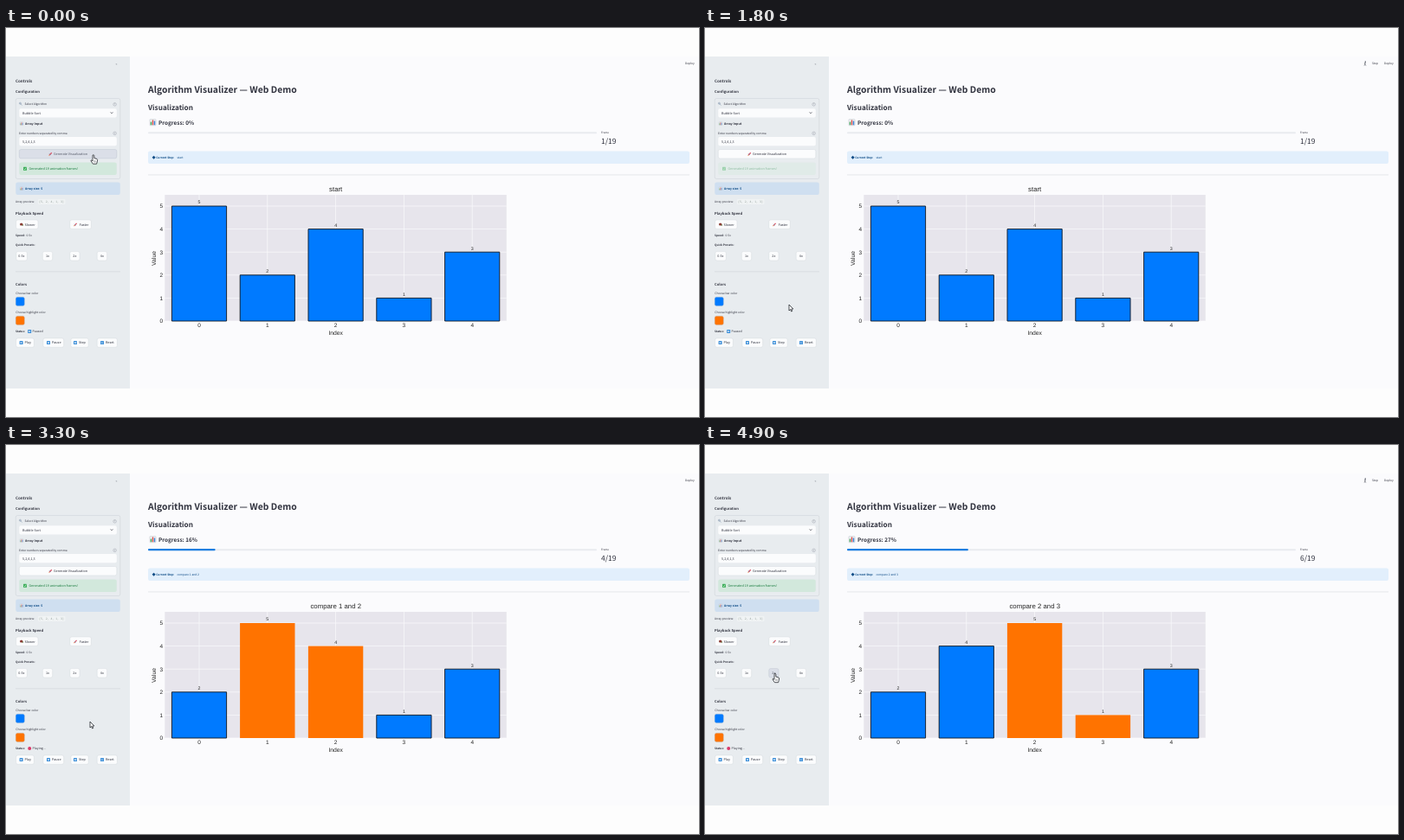
These frames come from a looping animation (800x450 px, 5000 ms). An HTML page with a canvas:

```html
<!DOCTYPE html>
<html lang="en">
<head>
<meta charset="utf-8">
<title>Algorithm Visualizer</title>
<style>
html, body { margin: 0; width: 100%; height: 100%; overflow: hidden; background: #fdfdfd; }
canvas { display: block; }
</style>
</head>
<body>
<canvas id="stage" width="800" height="450"></canvas>
<script>
const c = document.getElementById('stage').getContext('2d');
const UI = '"Noto Sans CJK JP", "Noto Sans CJK SC", "Noto Sans CJK", "Open Sans", sans-serif';
const PLOT = '"Liberation Sans", Arial, sans-serif';
const MONO = '"Noto Sans Mono", "DejaVu Sans Mono", monospace';
const INK = '#31333f', BLUE = '#007aff', ORANGE = '#ff7300', LINK = '#0b4a85';
const LOOP = 5000, TICK = 100;
const ZOOM = 0.2634;            // page zoom: CSS px to stage px
const LATIN = 1 / 1.117;        // size correction for the UI face

// Bubble sort states and the times at which they appear
const times = [0, 1900, 2500, 3200, 3800, 4400];
const percents = [0, 5, 11, 16, 22, 27];
const steps = [{ label: 'start', arr: [5, 2, 4, 1, 3], hot: [] }];
for (let i = 0, arr = steps[0].arr; i < 3; i++) {
  steps.push({ label: `compare ${i} and ${i + 1}`, arr, hot: [i, i + 1] });
  arr = arr.slice();
  [arr[i], arr[i + 1]] = [arr[i + 1], arr[i]];
  steps.push({ label: `swapped ${i} & ${i + 1}`, arr, hot: [i, i + 1] });
}

function type(s, x, y, size, font, color, align = 'left') {
  c.save();
  c.translate(x, y);
  c.scale(0.1, 0.1);
  c.font = font.replace('$', size * 10 + 'px');
  c.textAlign = align;
  c.fillStyle = color;
  c.fillText(s, 0, 0);
  c.restore();
}

// UI text, y is the middle of the capitals
function text(s, x, y, px = 14, bold = false, color = INK) {
  const size = px * ZOOM, fit = bold && px < 40 ? 0.97 : 1;
  type(s, x, y + size * 0.32, size * LATIN * fit, `${bold ? 700 : 400} $ ${UI}`, color);
}
const plotText = (s, x, y, size, color = '#262626', align = 'center') =>
  type(s, x, y + size * 0.36, size, `400 $ ${PLOT}`, color, align);

function box(x, y, x2, y2, fill, stroke, r = 2) {
  c.beginPath();
  c.roundRect(x, y, x2 - x, y2 - y, r);
  if (fill) { c.fillStyle = fill; c.fill(); }
  if (stroke) { c.strokeStyle = stroke; c.lineWidth = 0.4; c.stroke(); }
}
function rect(x, y, w, h, fill) { c.fillStyle = fill; c.fillRect(x, y, w, h); }
function dot(x, y, r, fill) { c.beginPath(); c.arc(x, y, r, 0, 7); c.fillStyle = fill; c.fill(); }
function line(color, width, ...p) {
  c.beginPath();
  for (let i = 0; i < p.length; i += 2) c.lineTo(p[i], p[i + 1]);
  c.strokeStyle = color;
  c.lineWidth = width;
  c.stroke();
}
function shape(points, x, y, fill) {
  c.beginPath();
  for (let i = 0; i < points.length; i += 2) c.lineTo(x + points[i], y + points[i + 1]);
  c.closePath();
  c.fillStyle = fill;
  c.fill();
}

// Small pictograms centred on x, y
function chart(x, y, s) {
  box(x - s / 2, y - s / 2, x + s / 2, y + s / 2, '#eef1f4', '#b4bcc6', s * 0.1);
  [['#43a85c', 0.5], ['#e2504a', 0.8], ['#3f83d8', 0.65]].forEach(([col, h], i) =>
    rect(x + s * (i * 0.28 - 0.38), y + s * (0.42 - h), s * 0.2, s * h, col));
}
function rocket(x, y) {
  line('#d8586a', 1.3, x - 1.4, y + 1.4, x + 1.3, y - 1.3);
  line('#7f93ad', 0.8, x - 1.4, y - 0.2, x + 0.2, y + 1.4);
  dot(x - 1.6, y + 1.6, 0.5, '#f08a3c');
}
function turtle(x, y) {
  box(x - 1.7, y - 1.5, x + 1.5, y + 1.4, '#8a3b33', null, 1);
  dot(x + 1.6, y + 0.8, 0.7, '#5b7a3c');
}
function key(kind, x, y) {
  box(x - 2, y - 2, x + 2, y + 2, '#3b8ed8', null, 0.6);
  if (kind === 'pause') {
    rect(x - 0.9, y - 1, 0.6, 2, '#fff');
    rect(x + 0.3, y - 1, 0.6, 2, '#fff');
  } else if (kind === 'reset') {
    c.beginPath(); c.arc(x, y, 0.9, 0.4, 5.4);
    c.strokeStyle = '#fff'; c.lineWidth = 0.5; c.stroke();
  } else {
    shape([-0.8, -1.1, 1, 0, -0.8, 1.1], x, y, '#fff');
    if (kind === 'step') rect(x + 0.8, y - 1, 0.4, 2, '#fff');
  }
}
function help(x, y) {
  c.beginPath(); c.arc(x, y, 1.8, 0, 7);
  c.strokeStyle = '#8a8f9a'; c.lineWidth = 0.4; c.stroke();
  type('?', x, y + 1, 2.6, `400 $ ${UI}`, '#70757f', 'center');
}
function button(x, x2, y, label, tx, hover, icon) {
  box(x, y, x2, y + 10.4, hover ? '#dbdfe8' : '#fbfcfd', hover ? '#b9bfcc' : '#d0d4da');
  if (icon) icon();
  text(label, tx, y + 5.2, 16, false, hover ? '#555a68' : INK);
}

function sidebar(playing, hover, stale) {
  rect(0, 33, 143, 384, '#e8ecef');
  text('«', 126.5, 41, 18, false, '#7d828c');
  text('Controls', 11, 61, 20, true);
  text('Configuration', 11, 73.6, 18, true);
  box(11.3, 81.5, 131.8, 174.5, null, '#c3c8cf');

  line('#8296ad', 0.6, 16.2, 87, 18.6, 89.4);
  c.beginPath(); c.arc(16.4, 87.2, 1, 0, 7); c.stroke();
  text('Select Algorithm', 21.5, 88.2);
  help(125.6, 88.3);
  box(15.3, 93.3, 127.8, 103.5, '#fbfcfd');
  text('Bubble Sort', 19, 98.3, 16);
  line(INK, 0.7, 120.7, 97.4, 122, 98.8, 123.3, 97.4);
  chart(18, 110.6, 3.6);
  text('Array Input', 22, 110.6, 16, true);
  text('Enter numbers separated by comma', 15, 121.6);
  help(125.6, 121.8);
  box(15.3, 126, 127.8, 136.2, '#fbfcfd');
  text('5,2,4,1,3', 19, 131.2, 16);
  button(15.3, 127.8, 140.5, 'Generate Visualization', 55, hover === 'generate', () => rocket(51.5, 145.6));

  c.globalAlpha = stale;
  box(15.3, 155.5, 127.8, 170, '#d2e8dc');
  box(20, 160.8, 24, 164.8, '#39ad57', null, 0.6);
  line('#fff', 0.6, 20.9, 162.8, 21.8, 163.8, 23.2, 161.7);
  text('Generated 19 animation frames!', 26.5, 162.8, 16, false, '#177a3c');
  c.globalAlpha = 1;

  box(11.3, 178.6, 131.8, 193, '#cfdff0');
  chart(18, 185.8, 3.6);
  text('Array size: 5', 22, 185.8, 15, true, LINK);
  text('Array preview:', 11, 201);
  box(37, 198, 68.5, 204, '#f0f3f4', null, 1);
  type('[5, 2, 4, 1, 3]', 38, 202.2, 3.2, `400 $ ${MONO}`, '#8d9b96');

  text('Playback Speed', 11, 214.5, 18, true);
  button(11.6, 37, 222, 'Slower', 21.5, false, () => turtle(17.8, 227.2));
  button(73.8, 98.4, 222, 'Faster', 84.7, false, () => rocket(80.3, 227.2));
  text('Speed:', 11, 239.8, 14, true);
  text('0.5x', 23.6, 239.8);
  text('Quick Presets:', 11, 250.8, 14, true);
  button(11.8, 24.4, 258.6, '0.5x', 14.3, false);
  button(42.3, 53.7, 258.6, '1x', 46, false);
  button(73.8, 85, 258.6, '2x', 77.3, hover === '2x');
  button(105.2, 116.6, 258.6, '4x', 108.8, false);
  rect(11, 281.6, 121, 0.6, '#cdd2d8');

  text('Colors', 11, 296.4, 18, true);
  text('Choose bar color', 11.3, 307);
  box(11.2, 311.2, 21.4, 321.4, BLUE, '#b9c2cc');
  text('Choose highlight color', 11.3, 328.8);
  box(11.2, 333.2, 21.4, 343.4, ORANGE, '#b9c2cc');
  text('Status:', 11, 351, 14, true);
  if (playing) dot(27.2, 351, 2, '#d93a6a');
  else key('pause', 27.2, 351);
  text(playing ? 'Playing...' : 'Paused', 30.6, 351, 15);

  button(11.6, 32.4, 358.9, 'Play', 21.4, hover === 'play', () => key('play', 17.6, 364.1));
  button(42.9, 66.7, 358.9, 'Pause', 53, false, () => key('pause', 49, 364.1));
  button(74.9, 95.2, 358.9, 'Step', 84, false, () => key('step', 80, 364.1));
  button(105.2, 128.4, 358.9, 'Reset', 115, false, () => key('reset', 111, 364.1));
}

function runner(t) {
  const x = 762, y = 41, s = Math.sin(t / 110) * 1.6;
  dot(x + 0.3, y - 2, 0.7, '#555964');
  line('#555964', 0.7, x + 0.2, y - 1.2, x - 0.1, y + 0.6);
  line('#555964', 0.6, x - s, y - 1.2 + s * 0.3, x, y - 0.7, x + s, y - 0.4 - s * 0.4);
  line('#555964', 0.6, x - s, y + 2.6, x - 0.1, y + 0.6, x + s, y + 2.6);
}

function header(step, n, fill, running, t) {
  rect(143, 33, 657, 384, '#fbfbfd');
  text('Deploy', 784, 41);
  if (running) { text('Stop', 770, 41); runner(t); }
  text('Algorithm Visualizer — Web Demo', 164, 71, 44, true);
  text('Visualization', 164, 91.8, 36, true);
  chart(169.5, 109.2, 7.2);
  text(`Progress: ${percents[n]}%`, 176, 109.2, 28, true);
  box(164, 120.2, 682, 122.2, '#e9ebf0', null, 1);
  if (fill) box(164, 120, 164 + 5.18 * fill, 122.2, '#1c7fe0', null, 1);
  text('Frame', 687, 121.3, 13);
  text(`${n + 1}/19`, 687, 131, 36);
  box(164, 142.5, 789, 157, '#e2effc');
  shape([-2, 0, 0, -2, 2, 0, 0, 2], 170.6, 149.8, LINK);
  text('Current Step:', 173.3, 149.8, 14, true, LINK);
  text(step.label, 197.5, 149.8, 14, false, LINK);
  rect(164, 169.6, 625, 0.7, '#d9dce2');
}

function plot({ label, arr, hot }) {
  const base = 339, unit = 26.6, colX = i => 223 + i * 78.8;
  rect(183.3, 193, 394.5, 146, '#e7e5ec');
  for (let v = 0; v < 6; v++) {
    rect(183.3, base - v * unit - 0.35, 394.5, 0.7, '#fafafc');
    plotText(v, 181.2, base - v * unit, 6.5, '#262626', 'right');
  }
  arr.forEach((v, i) => {
    const x = colX(i), top = base - v * unit, on = hot.includes(i);
    rect(x - 0.35, 193, 0.7, 146, '#fafafc');
    rect(x - 31.7, top, 63.4, base - top, on ? ORANGE : BLUE);
    if (!on) line('#111820', 0.9, x - 31.6, base, x - 31.6, top, x + 31.6, top, x + 31.6, base, x - 31.6, base);
    plotText(v, x, top - 4.6, 5.3);
    plotText(i, x, 344, 6.5);
  });
  plotText(label, 380.7, 186.2, 7.8);
  plotText('Index', 380.7, 352.4, 6.8);
  c.save();
  c.translate(171, 266.5);
  c.rotate(-Math.PI / 2);
  plotText('Value', 0, 0, 6.8);
  c.restore();
}

const ease = u => u * u * (3 - 2 * u);
const clamp = u => Math.max(0, Math.min(1, u));
// start, end, target x, target y
const moves = [[0, 0, 101, 147], [50, 650, 26, 365.5], [800, 1300, 97, 320], [4200, 4800, 81, 264.5]];

function pointer(t, hand) {
  let [, , x, y] = moves[0];
  for (const [t0, t1, x1, y1] of moves.slice(1)) {
    const u = ease(clamp((t - t0) / (t1 - t0)));
    x += (x1 - x) * u;
    y += (y1 - y) * u;
  }
  const pts = hand
    ? [-0.9, 0, 0.3, -0.2, 0.8, 0.6, 0.9, 3.6, 3.9, 4.4, 4.6, 5.4, 4.2, 8, 3.6, 10.2, -0.6, 10.2, -3, 6.6, -2.6, 5.8, -1, 6.8]
    : [0, 0, 0, 7, 1.6, 5.6, 2.7, 8, 3.7, 7.5, 2.7, 5.1, 4.8, 5];
  c.lineJoin = 'round';
  shape(pts, x, y, '#fff');
  c.strokeStyle = '#23262c';
  c.lineWidth = 0.8;
  c.stroke();
  if (hand) for (const k of [0.8, 2.1]) line('#23262c', 0.4, x + k, y + 6.2, x + k, y + 8.6);
  c.lineJoin = 'miter';
}

function draw(now) {
  const t = Math.floor((now % LOOP) / TICK) * TICK;
  const n = times.filter(s => s <= t).length - 1;
  const since = t - times[n];
  const prev = percents[Math.max(0, n - 1)];
  const fill = prev + (percents[n] - prev) * (1 - (1 - clamp(since / 200)) ** 2.3);
  const hover = t < 100 ? 'generate' : t >= 600 && t < 900 ? 'play' : t >= 4700 ? '2x' : '';
  const running = t >= 1000 && !(n > 1 && since < 200);
  const stale = 1 - 0.6 * clamp((t - 1100) / 300) + 0.6 * clamp((t - 2000) / 500);

  rect(0, 0, 800, 450, '#fdfdfd');
  header(steps[n], n, fill, running, t);
  sidebar(n > 0, hover, stale);
  plot(steps[n]);
  pointer(t, hover !== '');
}

c.textRendering = 'geometricPrecision';
const start = performance.now();
function loop() {
  draw(performance.now() - start);
  requestAnimationFrame(loop);
}
loop();
</script>
</body>
</html>
```
